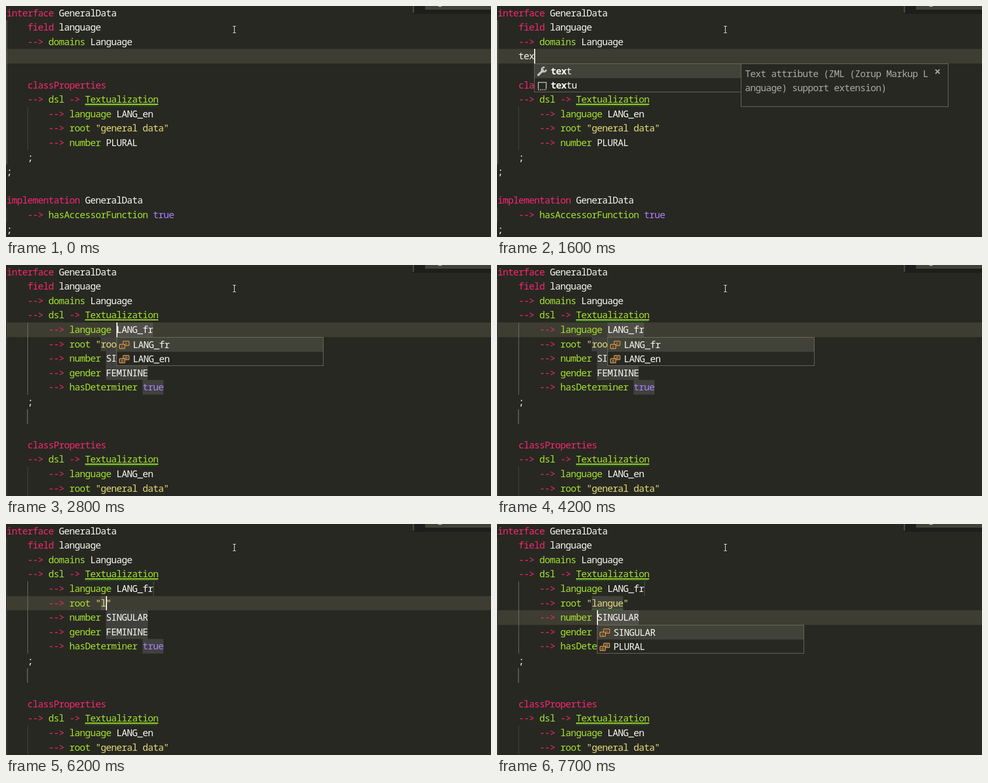
An HTML page that plays this animation: 927 px wide and 442 px high, repeating every 8000 ms.

```html
<!DOCTYPE html>
<html lang="en">
<head>
<meta charset="utf-8">
<title>Snippet completion</title>
<style>
html, body { margin: 0; width: 100%; height: 100%; overflow: hidden; background: #272822; }
svg { display: block; width: 100%; height: 100%; }
text { font: 18px "Noto Sans Mono", "DejaVu Sans Mono", monospace; letter-spacing: -0.8px; white-space: pre; }
</style>
</head>
<body>
<svg id="stage" viewBox="0 0 927 442"></svg>
<script>
(() => {
const LOOP = 8000;
const C = {
  bg: '#272822', line: '#3e3d32', fg: '#f8f8f2', pink: '#f92672', green: '#a6e22e',
  yellow: '#e6db74', purple: '#ae81ff', border: '#75715e', pick: '#414339',
  guide: '#464741', active: '#767771', grey: '#aaaaa5', orange: '#e8a355'
};
const KEYWORDS = ['interface', 'field', 'classProperties', 'implementation'];

const HEAD = ['interface GeneralData', '    field language', '    --> domains Language'];
const PROPS = [
  '    classProperties',
  '    --> dsl -> Textualization',
  '        --> language LANG_en',
  '        --> root "general data"',
  '        --> number PLURAL',
  '    ;',
  ';',
  '',
  'implementation GeneralData',
  '    --> hasAccessorFunction true',
  ';'
];
const snippet = root => [
  '--> dsl -> Textualization',
  '    --> language LANG_fr',
  `    --> root "${root}"`,
  '    --> number SINGULAR',
  '    --> gender FEMININE',
  '    --> hasDeterminer true',
  ';'
];
const ORIGIN = 'attribute (ZML (Zorup Markup Language) support extension)';

// Each step changes part of the editor state at a given time.
const STEPS = [
  [0, { word: '', row: 3, col: 4, on: 0, menu: 0, pick: 0, form: 0, root: 'root_string', lang: 1, wavy: 0, sel: 0, choices: null, spell: 0 }],
  [400, { word: 't', col: 5, on: 1, menu: 5 }],
  [600, { word: 'tr', col: 6, menu: 0 }],
  [1100, { on: 0 }],
  [1200, { word: 't', col: 5, on: 1 }],
  [1300, { word: 'te', col: 6, menu: 6 }],
  [1500, { word: 'tex', col: 7 }],
  [1600, { menu: 7 }],
  [2000, { on: 0 }],
  [2400, { pick: 1 }],
  [2800, { form: 1, menu: 0, row: 4, col: 21, on: 1, choices: ['LANG_fr', 'LANG_en'] }],
  [3100, { wavy: 1 }],
  [3200, { on: 0 }],
  [3700, { on: 1 }],
  [4200, { on: 0 }],
  [4300, { on: 1, col: 28, lang: 0, choices: null }],
  [4700, { row: 5, col: 29, sel: 1 }],
  [5200, { on: 0 }],
  [5800, { on: 1 }],
  [6200, { root: 'l', col: 19, sel: 0 }],
  [6300, { root: 'la', col: 20 }],
  [6400, { root: 'lan', col: 21 }],
  [6600, { root: 'lang', col: 22 }],
  [6800, { root: 'langu', col: 23 }],
  [7000, { root: 'langue', col: 24 }],
  [7300, { spell: 1 }],
  [7500, { row: 6, col: 19, choices: ['SINGULAR', 'PLURAL'] }]
];

const stateAt = t => Object.assign({}, ...STEPS.filter(s => s[0] <= t).map(s => s[1]));

const rowY = row => Math.round(27.6 * row - 0.4);
const colX = col => col * 10 + 1;
const rect = (x, y, w, h, fill, extra = '') =>
  `<rect x="${x}" y="${y}" width="${w}" height="${h}" fill="${fill}" ${extra}/>`;
const text = (x, y, s, fill) => `<text x="${x}" y="${y}" fill="${fill}">${s}</text>`;
const path = (d, stroke, w, extra = '') => `<path d="${d}" fill="none" stroke="${stroke}" stroke-width="${w}" ${extra}/>`;
const panel = (x, y, w, h) => rect(x, y, w, h, C.bg, `stroke="${C.border}"`);
const guide = (col, from, to, color) => rect(colX(col), rowY(from), 1, rowY(to) - rowY(from), color);

function code(x, y, line) {
  let out = '', prev = '';
  for (const m of line.matchAll(/--?>|"[^"]*"|\w+|;/g)) {
    const s = m[0], px = x + m.index * 10;
    const link = s === 'Textualization';
    const fill = s.endsWith('>') || KEYWORDS.includes(s) ? C.pink
      : prev === '-->' || link ? C.green
      : s[0] === '"' ? C.yellow
      : s === 'true' ? C.purple : C.fg;
    out += text(px, y, s.replace('>', '&gt;'), fill);
    if (link) out += rect(px, y + 2, s.length * 10, 2, C.green);
    prev = s;
  }
  return out;
}

function wave(row, col, len) {
  const x = colX(col), y = rowY(row) + 26.5;
  let d = `M${x} ${y}`;
  for (let i = 3; i <= len * 10; i += 3) d += `L${x + i} ${y - (i / 3 % 2) * 2}`;
  return path(d, '#2f8f2a', 1);
}

const slot = (row, col, len) =>
  rect(colX(col), rowY(row), len ? len * 10 : 2, rowY(row + 1) - rowY(row), '#7c7c7c', 'fill-opacity=".3"');

const ICONS = {
  wrench: path('M7.5 21.5L16.5 12.5', '#c5c5c5', 4, 'stroke-linecap="round"') +
    path('M19.5 7.2A4.2 4.2 0 1 0 22.4 11.2', '#c5c5c5', 3.2),
  snippet: path('M7.5 21V8.5H22.5V21', '#c5c5c5', 1.6) +
    path('M7 22.5H23.5', '#c5c5c5', 2, 'stroke-dasharray="2 2"'),
  choice: rect(12.5, 7.5, 11, 8, C.bg, `stroke="${C.orange}" stroke-width="1.5" rx="1"`) +
    path('M15 10.5H21M15 13H21', C.orange, 1.2) +
    rect(5.5, 13.5, 10, 8, C.bg, `stroke="${C.orange}" stroke-width="1.5" rx="1"`) +
    path('M8 16.5H13M8 19H13', C.orange, 1.2)
};

function list(x, y, items, picked, match, icons) {
  let out = panel(x, y, 395, 54);
  items.forEach((s, i) => {
    const iy = y + 27.2 * i;
    if (i === picked) out += rect(x + .5, Math.round(iy), 394, 27, C.pick);
    out += `<g transform="translate(${x} ${iy})">${ICONS[icons[i]]}</g>`;
    const label = `<tspan font-weight="700">${s.slice(0, match)}</tspan>${s.slice(match)}`;
    out += text(x + 31, iy + 20.5, match ? label : s, C.fg);
  });
  return out;
}

function details(x, y, title, body) {
  const lines = `${title} ${ORIGIN}`.match(/.{1,35}/g);
  let out = panel(x, y, 396, body.length ? 291 : 82);
  lines.forEach((s, i) => out += text(x + 7.5, y + 25.5 + 27 * i, s, C.grey));
  body.forEach((s, i) => out += code(x + 7.5, y + 116.5 + 27.15 * i, s));
  return out + path(`M${x + 371.5} ${y + 11}l8 8m0 -8l-8 8`, C.grey, 2.4);
}

function suggestions(s) {
  const x = colX(s.menu) + .5, y = rowY(4) + .5;
  return list(x, y, ['text', 'textu'], s.pick, s.word.length, ['wrench', 'snippet']) +
    (s.pick ? details(x + 395, y, 'Textualization', snippet('root_string')) : details(x + 395, y, 'Text', []));
}

function guides(form) {
  return form
    ? guide(0, 1, 17, C.guide) + guide(4, 4, 9, C.active) + guide(4, 14, 17, C.guide) +
      rect(40, rowY(10), 2, 28, '#5c5c58')
    : guide(0, 1, 11, C.active) + guide(4, 7, 10, C.guide) + guide(0, 14, 15, C.guide);
}

function slots(s) {
  return slot(4, s.lang ? 21 : 28, s.lang ? 7 : 0) + slot(5, 18, s.root.length) +
    slot(6, 19, 8) + slot(7, 19, 8) + slot(8, 26, 4);
}

const CORNER = rect(776, 0, 151, 15, '#000', 'fill-opacity=".25"') +
  rect(777, 0, 150, 13, '#1e1f1c') + rect(777, 0, 3, 13, '#484845') + rect(801, 0, 126, 7, C.pick) +
  path('M826 0Q829.5 1.8 833 0', '#d8d8d2', 1.2);

const BEAM = 'M433.5 38.5H435.5L436.5 39.5L437.5 38.5H439.5M436.5 39.5V50.5M433.5 51.5H435.5L436.5 50.5L437.5 51.5H439.5';
const POINTER = path(BEAM, '#111', 3) + path(BEAM, '#fff', 1.2);

function draw(t) {
  const s = stateAt(t);
  const lines = s.form
    ? [...HEAD, ...snippet(s.root).map(l => '    ' + l), '', '', ...PROPS]
    : [...HEAD, '    ' + s.word, '', ...PROPS];
  const y = rowY(s.row), h = rowY(s.row + 1) - y;
  let out = rect(0, 0, 927, 442, C.bg);
  if (!s.sel) out += rect(2, y, 925, h, C.line);
  out += guides(s.form);
  if (s.form) out += slots(s);
  if (s.sel) out += rect(colX(18), y, 110, h, '#878b91', 'fill-opacity=".5"');
  lines.slice(0, 16).forEach((l, i) => out += code(1, rowY(i) + 20, l));
  out += wave(s.form ? 13 : 6, 15, 14);
  if (s.wavy) out += wave(3, 15, 14);
  if (s.spell) out += wave(5, 18, 6);
  if (s.on) out += rect(colX(s.col), y, 2, h, C.fg);
  if (s.menu) out += suggestions(s);
  if (s.choices) out += list(colX(s.col) + .5, rowY(s.row + 1) + .5, s.choices, 0, 0, ['choice', 'choice']);
  return out + CORNER + POINTER;
}

const stage = document.getElementById('stage');
let shown = '';
function tick() {
  const next = draw(performance.now() % LOOP);
  if (next !== shown) stage.innerHTML = shown = next;
  requestAnimationFrame(tick);
}
tick();
})();
</script>
</body>
</html>
```
